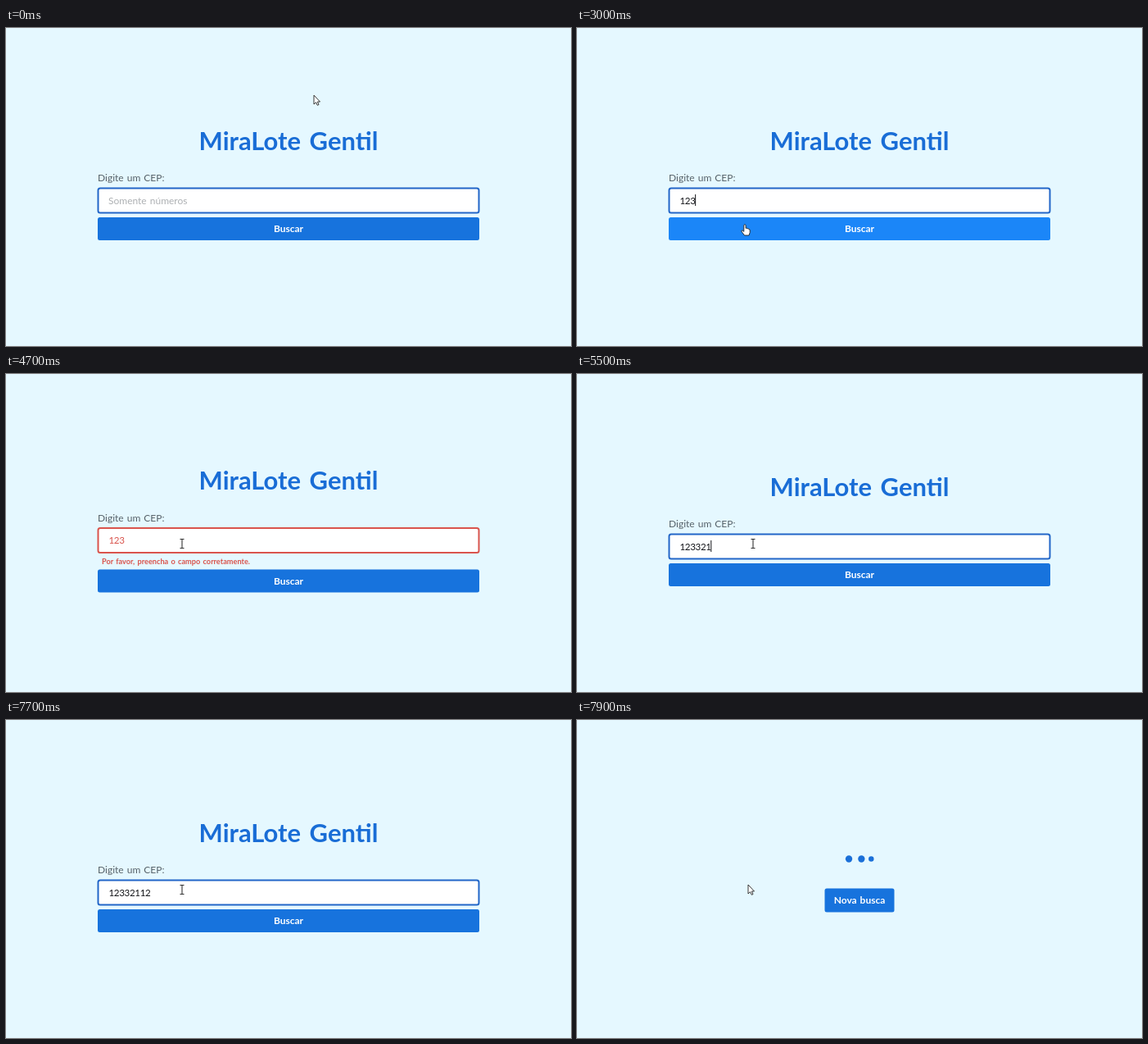
Animation of 690 by 388 pixels, one loop 8 s. Source, as an HTML page:

```html
<!DOCTYPE html>
<html lang="pt-BR">
<head>
<meta charset="utf-8">
<title>Busca de CEP</title>
<style>
  html, body { margin: 0; width: 100%; height: 100%; overflow: hidden; background: #e5f8ff; }
  svg { display: block; width: 690px; height: 388px; }
  text { font: 12px Lato, "Open Sans", sans-serif; word-spacing: 1px; }
  .mid { text-anchor: middle; }
  #title { font-size: 31px; font-weight: 700; word-spacing: 3px; fill: #196dd6; }
  #label { fill: #566168; }
  #hint { fill: #adb0b3; }
  #value { font-size: 11.6px; letter-spacing: -.35px; }
  #error { font-size: 9.2px; font-weight: 700; fill: #d9544d; }
  .caption { font-weight: 700; fill: #fff; }
  #field { fill: #fff; stroke-width: 2; }
  .pointer path { stroke: #222; stroke-width: .9; fill: #fff; stroke-linejoin: round; }
  #ibeam path { fill: none; stroke: #333; stroke-width: 1.1; }
</style>
</head>
<body>
<svg viewBox="0 0 690 388">
  <rect width="690" height="388" fill="#e5f8ff"/>
  <g id="form">
    <g id="top">
      <text id="title" class="mid" x="345" y="148.5">MiraLote Gentil</text>
      <text id="label" x="112" y="187">Digite um CEP:</text>
      <rect id="field" x="112.5" y="195.5" width="465" height="30" rx="2.5"/>
      <text id="hint" x="125" y="214.5">Somente números</text>
      <text id="value" x="125.5" y="214.5"></text>
      <rect id="caret" y="203" width="1" height="14"/>
    </g>
    <text id="error" x="117" y="232">Por favor, preencha o campo corretamente.</text>
    <g id="submit">
      <rect id="face" x="112" y="231" width="466" height="28" rx="2.5"/>
      <text class="caption mid" x="345" y="249.3">Buscar</text>
    </g>
  </g>
  <g id="loading">
    <g id="dots" fill="#1a6fd8"><circle/><circle/><circle/><circle/></g>
    <rect x="302.5" y="205.5" width="85" height="29" rx="2.5" fill="#1773dd"/>
    <text class="caption mid" x="345" y="224.3">Nova busca</text>
  </g>
  <g class="pointer">
    <g id="arrow"><path d="M0 0V11L2.6 8.7 4.3 12.3 6 11.5 4.4 8H7.5Z"/></g>
    <g id="ibeam"><path d="M-2.5 -5.5H2.5M0 -5.5V5.5M-2.5 5.5H2.5"/></g>
    <g id="hand"><path d="M-1.2 .5Q0 -1.2 1.1 .5V4.3Q2.3 3.6 3 4.8 4.5 4.3 4.8 5.5 6.3 5.3 6.2 7V9.5L5 13H-.5L-4.2 8Q-4 6.4 -2.8 7L-1.2 8.4Z"/></g>
  </g>
</svg>
<script>
const LOOP = 8000, STEP = 100, SHIFT = 7.5, DIGIT = 6.38;
const DIGITS = "12332112";
const KEYS = [2300, 2400, 2600, 4900, 5100, 5300, 6900, 7100];
const CARET_ON = [[1000, 1100], [1600, 2100], [2300, 3100], [4200, 4700], [4900, 5800], [6400, 7700]];
const INVALID = [[3400, 4900], [5800, 6900]];
const LOAD_AT = 7800, DOTS_AT = 7887;
// time, x, y of the pointer's hot spot
const PATH = [
  [100, 376, 82], [900, 300, 211], [1100, 173, 216], [2700, 173, 216], [2900, 203, 240],
  [3000, 205, 240], [3200, 206, 244], [3500, 206, 246], [4000, 215, 207], [7700, 215, 207], [7800, 209, 201]
];
const BLUE = [34, 102, 200], RED = [217, 84, 77], INK = [20, 22, 26];
const FACE = [23, 115, 221], FACE_HOVER = [27, 134, 248];

const $ = id => document.getElementById(id);
const ramp = (t, a, b) => Math.min(1, Math.max(0, (t - a) / (b - a)));
const within = (t, spans) => spans.some(([a, b]) => t >= a && t < b);
const mix = (a, b, p) => `rgb(${a.map((v, i) => Math.round(v + (b[i] - v) * p))})`;
const show = (id, on) => $(id).style.display = on ? "" : "none";
const move = (id, x, y) => $(id).setAttribute("transform", `translate(${x} ${y})`);

function pointerAt(t) {
  let i = 0;
  while (i < PATH.length - 2 && t > PATH[i + 1][0]) i++;
  const [a, b] = [PATH[i], PATH[i + 1]], p = ramp(t, a[0], b[0]);
  return [a[1] + (b[1] - a[1]) * p, a[2] + (b[2] - a[2]) * p];
}

function drawPointer(t, shift) {
  const [x, y] = pointerAt(t);
  let kind = "arrow";
  if (t < LOAD_AT) {
    if (y > 194 - shift && y < 227 - shift) kind = "ibeam";
    else if (y > 231 + shift && y < 259 + shift) kind = "hand";
  }
  for (const id of ["arrow", "ibeam", "hand"]) show(id, id === kind);
  move(kind, x, y);
}

// cubic-bezier(0, 1, 1, 0)
function snap(x) {
  const s = .5 - Math.sin(Math.asin(1 - 2 * x) / 3);
  return 3 * s * (1 - s) ** 2 + s ** 3;
}

function drawDots(t) {
  const p = snap(Math.max(0, t - DOTS_AT) % 600 / 600), gap = 15.3;
  const places = [[0, p], [p, 1], [1 + p, 1], [2, 1 - p]];
  [...$("dots").children].forEach((dot, i) => {
    const [slot, size] = places[i];
    dot.setAttribute("cx", 328.7 + slot * gap);
    dot.setAttribute("cy", 169.5);
    dot.setAttribute("r", 4.15 * size);
  });
}

function draw(t) {
  const invalid = within(t, INVALID), shift = invalid ? SHIFT : 0;
  const red = ramp(t, 3300, 3700) - ramp(t, 4800, 5100) + ramp(t, 5700, 6100) - ramp(t, 6800, 7100);
  const hover = ramp(t, 2800, 3000) - ramp(t, 3550, 3800);
  const count = KEYS.filter(k => t >= k).length;
  const ink = mix(INK, RED, red);

  show("form", t < LOAD_AT);
  show("loading", t >= LOAD_AT);
  move("top", 0, -shift);
  move("submit", 0, shift);
  show("error", invalid);
  show("hint", !count);
  show("caret", within(t, CARET_ON));
  $("value").textContent = DIGITS.slice(0, count);
  $("value").style.fill = $("caret").style.fill = ink;
  $("caret").setAttribute("x", 125 + count * DIGIT);
  $("field").style.stroke = mix(BLUE, RED, red);
  $("face").style.fill = mix(FACE, FACE_HOVER, hover);
  drawDots(t);
  drawPointer(t, shift);
}

const start = performance.now();
function tick() {
  const t = (performance.now() - start) % LOOP;
  draw(Math.floor(t / STEP) * STEP);
  requestAnimationFrame(tick);
}
tick();
</script>
</body>
</html>
```
